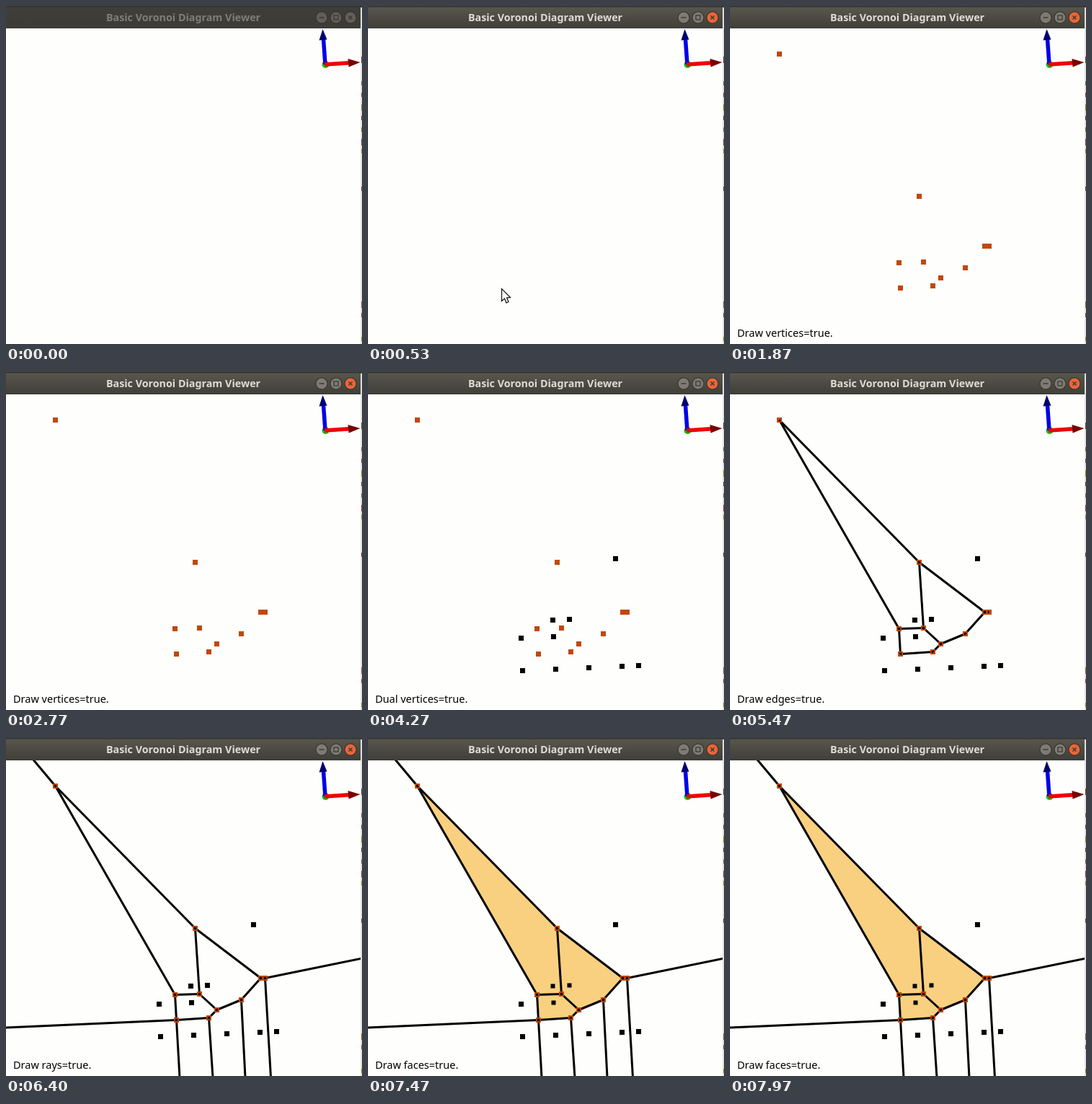
An HTML page with a canvas for the animation above (8 s loop, 494 px wide and 468 px high).

```html
<!DOCTYPE html>
<html lang="en">
<head>
<meta charset="utf-8">
<title>Basic Voronoi Diagram Viewer</title>
<style>
  html, body { margin: 0; width: 100%; height: 100%; overflow: hidden; background: #fefefc; }
  canvas { display: block; }
</style>
</head>
<body>
<canvas id="stage" width="494" height="468"></canvas>
<script>
const ctx = document.getElementById('stage').getContext('2d');
const W = 494, H = 468, BAR = 31, LOOP = 8000;
const PAPER = '#fefefc', VERTEX = '#c04808';
const FONT = '"Noto Sans", "Open Sans", sans-serif';

// Times at which each part of the diagram is switched on
const ON = { focus: 470, vertices: 1870, dual: 3470, edges: 4930, rays: 6130, faces: 7270 };
const MESSAGES = [
  ['faces', 'Draw faces=true.'], ['rays', 'Draw rays=true.'], ['edges', 'Draw edges=true.'],
  ['dual', 'Dual vertices=true.'], ['vertices', 'Draw vertices=true.']
];

const V = {
  A: [68.5, 66.5], B: [262.5, 263.5], C: [234.5, 355.5], D: [268.5, 354.5], E: [236.5, 390.5],
  F: [281.5, 387.5], G: [292.5, 376.5], H: [326.5, 362.5], I: [353.5, 332.5], J: [359.5, 332.5]
};
const EDGES = 'AB AC BD CD CE EF FG DG GH HI IB IJ'.split(' ');
const FACES = ['ABDC', 'CDGFE', 'BIHGD'];
const RAYS = [
  ['A', 37, 29], ['E', -2, 401], ['E', 241, 470], ['F', 287, 470],
  ['H', 332, 470], ['J', 367.5, 470], ['J', 494, 305]
];
// The first three sites lie inside bounded cells
const SITES = [
  [256.5, 343.5], [279.5, 342.5], [257.5, 366.5], [343.5, 258.5], [212.5, 368.5],
  [214.5, 413.5], [260.5, 411.5], [306.5, 409.5], [352.5, 407.5], [375.5, 406.5]
];
const CURSOR = [[0, 0], [0, 17], [4, 13.5], [6.5, 19.5], [9.5, 18], [7, 12.5], [12, 12]];

function rect(x, y, w, h, color) {
  ctx.fillStyle = color;
  ctx.fillRect(x, y, w, h);
}

function square([x, y], size, color) {
  rect(x - size / 2, y - size / 2, size, size, color);
}

function poly(points, color) {
  ctx.beginPath();
  points.forEach(([x, y]) => ctx.lineTo(x, y));
  ctx.closePath();
  ctx.fillStyle = color;
  ctx.fill();
}

function line([x1, y1], [x2, y2], width, color) {
  ctx.beginPath();
  ctx.moveTo(x1, y1);
  ctx.lineTo(x2, y2);
  ctx.lineWidth = width;
  ctx.strokeStyle = color;
  ctx.stroke();
}

function disc(x, y, r, color) {
  ctx.beginPath();
  ctx.arc(x, y, r, 0, Math.PI * 2);
  ctx.fillStyle = color;
  ctx.fill();
}

function text(str, x, y, font, color, align = 'left') {
  ctx.font = font + ' ' + FONT;
  ctx.textAlign = align;
  ctx.fillStyle = color;
  ctx.fillText(str, x, y);
}

function drawBar(focused) {
  const fill = ctx.createLinearGradient(0, 0, 0, BAR);
  fill.addColorStop(0, focused ? '#5a584e' : '#3f3e39');
  fill.addColorStop(1, focused ? '#3f3e38' : '#3c3b36');
  rect(0, 0, W, BAR, fill);
  rect(0, 0, W, 1.5, '#33322c');
  rect(492, 2, 2, BAR - 2, '#dddcd6');
  text('Basic Voronoi Diagram Viewer', 246, 21, 'bold 14.3px', focused ? '#dfdbd2' : '#807d78', 'center');

  const gray = focused ? '#7d7b72' : '#625f58';
  const mark = focused ? '#3c3b36' : '#3a3934';
  [438, 458, 478].forEach((x, i) => {
    disc(x, 16, 8.5, '#32312c');
    disc(x, 16, 7.5, focused && i === 2 ? '#ea6538' : gray);
  });
  line([434.5, 16], [441.5, 16], 1.5, mark);
  ctx.lineWidth = 1.3;
  ctx.strokeRect(455, 13, 6, 6);
  line([475.5, 13.5], [480.5, 18.5], 1.5, mark);
  line([480.5, 13.5], [475.5, 18.5], 1.5, mark);
}

function drawAxes() {
  disc(443.5, 81, 5, '#00c800');
  line([443, 81], [440.5, 46], 5.5, '#0000e6');
  poly([[434.5, 47.5], [445.5, 46.5], [439.5, 32]], '#00006e');
  line([442, 81], [476, 78.7], 5.5, '#f00000');
  poly([[474.5, 73], [475.5, 84.5], [491.5, 78]], '#780000');
}

function drawSide() {
  rect(492, BAR, 2, H - BAR, '#e2e1dc');
  const colors = ['#5a4a3c', '#77753a', '#a03c50', '#8c9630'];
  [70, 104, 120, 136, 152, 168, 184, 198, 250, 409, 425, 458].forEach((y, i) =>
    rect(493, y, 1, i % 3 ? 6 : 9, colors[i % 4]));
}

function drawDiagram(on) {
  ctx.save();
  ctx.beginPath();
  ctx.rect(0, BAR, 492, H - BAR);
  ctx.clip();
  if (on('faces')) FACES.forEach(f => poly([...f].map(k => V[k]), '#f9d080'));
  if (on('vertices')) Object.values(V).forEach(p => square(p, 7, VERTEX));
  if (on('dual')) SITES.forEach((p, i) => square(p, on('faces') && i < 3 ? 6 : 7, '#000'));
  if (on('edges')) EDGES.forEach(e => line(V[e[0]], V[e[1]], 3, '#000'));
  if (on('rays')) RAYS.forEach(([k, x, y]) => line(V[k], [x, y], 3, '#000'));
  // Vertex markers stay visible around the line joints
  if (on('edges')) {
    ctx.lineWidth = 1.8;
    ctx.strokeStyle = VERTEX;
    Object.values(V).forEach(([x, y]) => ctx.strokeRect(x - 2.6, y - 2.6, 5.2, 5.2));
  }
  ctx.restore();
  const message = MESSAGES.find(([key]) => on(key));
  if (message) text(message[1], 10, 458, '14.5px', '#000');
}

const ease = k => k * k * (3 - 2 * k);

function drawCursor(t) {
  if (t < 100 || t > 880) return;
  // Comes in from the right, clicks, and goes back
  let k = 0;
  if (t < 440) k = 1 - ease((t - 100) / 340);
  else if (t > 600) k = ease((t - 600) / 280);
  ctx.save();
  ctx.translate(185.5 + 309 * k, 391.5 + 30 * k);
  poly(CURSOR, '#fff');
  ctx.lineWidth = 1.3;
  ctx.strokeStyle = '#1a1a16';
  ctx.stroke();
  ctx.restore();
}

function draw(t) {
  const on = key => t >= ON[key];
  rect(0, 0, W, H, PAPER);
  drawSide();
  drawDiagram(on);
  drawAxes();
  drawBar(on('focus'));
  drawCursor(t);
}

function tick() {
  draw(performance.now() % LOOP);
  requestAnimationFrame(tick);
}
tick();
</script>
</body>
</html>
```
